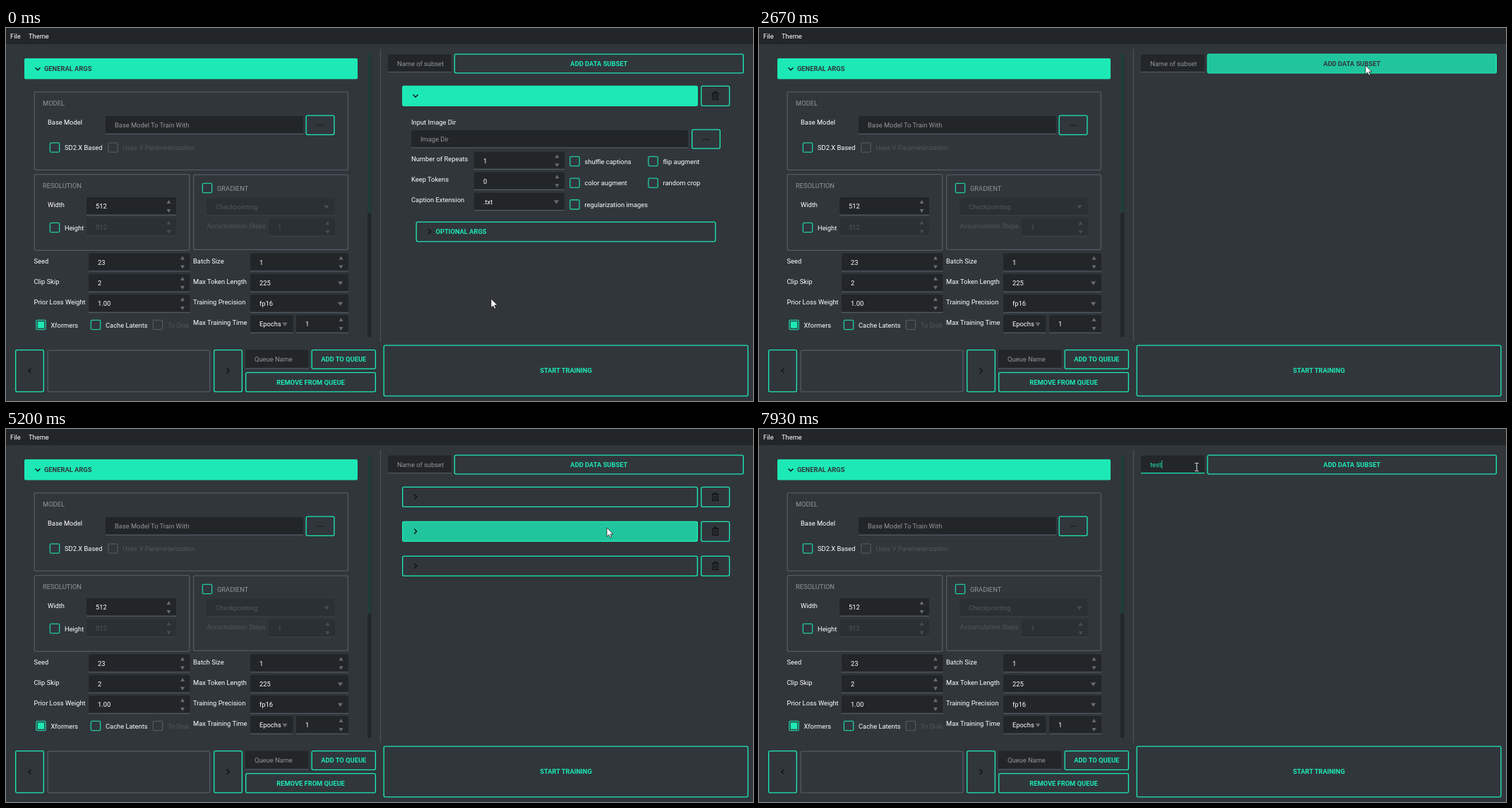
An HTML page that plays this animation: 1058x529 px, repeating every 8000 ms.

```html
<!DOCTYPE html>
<html lang="en">
<head>
<meta charset="utf-8">
<title>Training settings</title>
<style>
  html, body { margin: 0; width: 100%; height: 100%; overflow: hidden; background: #31363b; }
  svg { display: block; width: 100vw; height: 100vh; }
  text { font: 9.33px Roboto, "Open Sans", sans-serif; white-space: pre; }
  .bold { font-weight: 700; }
</style>
</head>
<body>
<svg id="stage" viewBox="0 0 1058 529">
  <g id="static"></g>
  <g id="live"></g>
  <g id="pointer"></g>
</svg>
<script>
const TEAL = '#1de9b6', BG = '#31363b', DARK = '#232629', EDGE = '#4f5b62';
const WHITE = '#fff', HINT = '#92969a', DIM = '#50575d', INK = '#0d0f10';
const FILLS = { hover: '#2d5a54', press: '#21c59d' };
const LINE = 1.33;

// ---- drawing helpers ----
const rect = (x0, y0, x1, y1, fill, stroke = 'none', r = 2) => {
  const inset = stroke === 'none' ? 0 : LINE / 2;
  return `<rect x="${x0 + inset}" y="${y0 + inset}" width="${x1 - x0 - 2 * inset}" height="${y1 - y0 - 2 * inset}"
    rx="${r}" fill="${fill}" stroke="${stroke}" stroke-width="${LINE}"/>`;
};
const text = (s, x, cy, fill = WHITE, attrs = '') =>
  `<text x="${x}" y="${cy + 3.3}" fill="${fill}" ${attrs}>${s}</text>`;
const bold = (s, x, cy, fill = TEAL, anchor = 'start') =>
  text(s, x, cy, fill, `class="bold" text-anchor="${anchor}"`);
const stroke = (d, color, width = LINE) =>
  `<path d="${d}" fill="none" stroke="${color}" stroke-width="${width}"/>`;

const chevron = (x, y, dir, color = INK) => stroke({
  down: `M${x - 3.5} ${y - 1.8}l3.5 3.5l3.5-3.5`,
  right: `M${x - 1.8} ${y - 3.5}l3.5 3.5l-3.5 3.5`,
  left: `M${x + 1.8} ${y - 3}l-3.5 3l3.5 3`
}[dir], color);

const triangle = (x, y, sign, color, half = 3) =>
  `<path d="M${x - half} ${y - sign * 2.6}h${2 * half}l${-half} ${sign * 5.2}z" fill="${color}"/>`;

const outline = (x0, y0, x1, y1) => rect(x0, y0, x1, y1, 'none', EDGE);

const button = (x0, y0, x1, y1, label = '', state = '') =>
  rect(x0, y0, x1, y1, FILLS[state] || 'none', TEAL) +
  bold(label, (x0 + x1) / 2, (y0 + y1) / 2, state === 'press' ? BG : TEAL, 'middle');

const browse = (x0, y0, x1, y1) => button(x0, y0, x1, y1) + [-3.2, 0, 3.2].map(dx =>
  `<circle cx="${(x0 + x1) / 2 + dx}" cy="${(y0 + y1) / 2 + .3}" r=".9" fill="${INK}"/>`).join('');

const field = (x0, y0, x1, y1, label, color = WHITE, line = EDGE) =>
  rect(x0, y0, x1, y1, color === DIM ? '#2b3034' : DARK) +
  `<rect x="${x0}" y="${y1 - LINE}" width="${x1 - x0}" height="${LINE}" fill="${color === DIM ? '#3b4146' : line}"/>` +
  text(label, x0 + 13, (y0 + y1) / 2, color);

const arrowColor = color => color === DIM ? '#474e54' : '#666c71';

const spin = (x0, y0, x1, y1, label, color) => field(x0, y0, x1, y1, label, color) +
  triangle(x1 - 10.5, (y0 + y1) / 2 - 6.5, -1, arrowColor(color)) +
  triangle(x1 - 10.5, (y0 + y1) / 2 + 6.5, 1, arrowColor(color));

const combo = (x0, y0, x1, y1, label, color) => field(x0, y0, x1, y1, label, color) +
  triangle(x1 - 11.5, (y0 + y1) / 2 + .3, 1, arrowColor(color), 3.6);

const check = (cx, cy, label, color = WHITE, on = false) =>
  rect(cx - 7.3, cy - 7.3, cx + 7.3, cy + 7.3, 'none', color === DIM ? DIM : '#1fcba1', 1.5) +
  (on ? rect(cx - 4.7, cy - 4.7, cx + 4.7, cy + 4.7, TEAL, 'none', 0) : '') +
  text(label, cx + 14, cy + .3, color);

// ---- fixed part of the window ----
function staticParts() {
  const parts = [
    rect(0, 0, 1058, 23, DARK, 'none', 0),
    text('File', 6, 11.5), text('Theme', 32, 11.5),
    rect(26, 43, 498, 72.5, TEAL), chevron(45, 58, 'down'), bold('GENERAL ARGS', 54, 58, BG),
    rect(512, 37, 517.3, 438, DARK, 'none', 0), rect(512, 37, 517.3, 262, '#213d38', 'none', 0),
    stroke('M530.3 30V445', EDGE, 1),

    outline(39.5, 90, 485, 202), text('MODEL', 52, 107, HINT),
    text('Base Model', 59, 134),
    field(141, 125, 421, 151, 'Base Model To Train With', HINT),
    browse(424.5, 123.5, 465.5, 152),
    check(69, 169.5, 'SD2.X Based'), check(151.5, 169.5, 'Uses V Parameterization', DIM),

    outline(39.5, 207, 260.5, 316), text('RESOLUTION', 52, 224, HINT),
    text('Width', 59, 251), spin(114, 240, 241, 266, '512'),
    check(69, 283, 'Height'), spin(114, 269.5, 241, 295.5, '512', DIM),

    outline(265, 207.5, 485, 315), check(285, 227, ''), text('GRADIENT', 299, 227.3, HINT),
    combo(284, 241, 465.5, 266.5, 'Checkpointing', DIM),
    text('Accumulation Steps', 284.5, 281, DIM), spin(372, 270, 466, 296, '1', DIM),

    check(49.5, 421, 'Xformers', WHITE, true), check(127, 421, 'Cache Latents'),
    check(215, 421, 'To Disk', DIM),

    button(13, 456, 54, 516.5), chevron(33.5, 486, 'left'),
    outline(58.5, 456.5, 289.5, 516.5),
    button(294, 456, 335, 516.5), chevron(314.5, 486, 'right'),
    field(339, 456.5, 428.5, 483.5, 'Queue Name', HINT),
    button(432.5, 456, 524, 484, 'ADD TO QUEUE'),
    button(339, 488, 524, 516.5, 'REMOVE FROM QUEUE'),
    button(534.5, 449.5, 1051.5, 522.5, 'START TRAINING')
  ];
  [['Seed', '23', 'Batch Size', '1', spin],
   ['Clip Skip', '2', 'Max Token Length', '225', combo],
   ['Prior Loss Weight', '1.00', 'Training Precision', 'fp16', combo]
  ].forEach(([leftLabel, left, rightLabel, right, kind], i) => {
    const y = 319.5 + 29.3 * i;
    parts.push(text(leftLabel, 39.5, y + 10.8), spin(117, y, 260.5, y + 26, left),
      text(rightLabel, 265, y + 10.8), kind(346, y, 485, y + 26, right));
  });
  parts.push(text('Max Training Time', 265, 418), combo(346, 407, 406.5, 433, 'Epochs'),
    spin(411, 407, 485, 433, '1'));
  return parts.join('');
}

// ---- data subsets ----
const subsetBody = [
  text('Input Image Dir', 574, 134),
  field(574, 145, 966, 170.5, 'Image Dir', HINT), browse(971, 143.5, 1012, 171.5),
  text('Number of Repeats', 574, 186), spin(663, 175.5, 791, 201, '1'),
  text('Keep Tokens', 574, 215), spin(663, 204.5, 791, 230, '0'),
  text('Caption Extension', 574, 244), combo(663, 233.8, 791, 259.3, '.txt'),
  check(805.5, 189, 'shuffle captions'), check(916.5, 189, 'flip augment'),
  check(805.5, 219.7, 'color augment'), check(916.5, 219.7, 'random crop'),
  check(805.5, 250.4, 'regularization images'),
  button(580.5, 274.5, 1005.5, 303.5), chevron(600, 289, 'right'), bold('OPTIONAL ARGS', 608.5, 289)
].join('');

const trash = stroke('M999.6 92.6h10M1002.8 92.3v-1.8h3.6v1.8M1000.8 92.8v8.6h7.6v-8.6M1003.4 94.8v4.6M1005.8 94.8v4.6', INK, 1.1);

function subset(y, open, headState, trashState) {
  const fill = FILLS[headState] || 'none';
  return `<g transform="translate(0 ${y})">` +
    rect(561, 81.7, 980, 111, open && headState !== 'press' ? TEAL : fill, TEAL) +
    chevron(580, 96.3, open ? 'down' : 'right') +
    button(984, 81.7, 1025.3, 111, '', trashState) + trash +
    (open ? subsetBody : '') + '</g>';
}

// ---- timeline, counted in ticks of 1/15 s ----
const TICKS = 120, LOOP = 8000;

// one letter per subset: o = open, c = closed
const lists = [[0, 'o'], [19, 'c'], [23, 'o'], [29, ''], [41, 'o'], [46, 'oc'], [51, 'occ'], [59, 'ccc'],
  [79, 'coc'], [83, 'ccc'], [90, 'cc'], [96, 'c'], [101, '']];

const names = [[0, ''], [114, 't'], [115, 'te'], [118, 'tes'], [119, 'test']];

const highlights = [
  [18, 'head0', 'press'], [19, 'head0', 'hover'], [22, 'head0', 'press'], [23, 'head0', 'hover'],
  [27, 'trash0', 'hover'], [28, 'trash0', 'press'], [29, '', ''],
  [40, 'add', 'press'], [41, 'add', 'hover'], [45, 'add', 'press'], [46, 'add', 'hover'],
  [50, 'add', 'press'], [51, 'add', 'hover'], [55, '', ''],
  [58, 'head0', 'press'], [59, 'head0', 'hover'], [63, '', ''],
  [66, 'head1', 'hover'], [78, 'head1', 'press'], [79, 'head1', 'hover'],
  [82, 'head1', 'press'], [83, 'head1', 'hover'], [87, 'trash1', 'hover'],
  [89, 'trash1', 'press'], [90, '', ''], [95, 'trash1', 'press'], [96, '', ''],
  [100, 'trash0', 'press'], [101, '', '']];

const path = [[0, 687, 384], [3, 712, 412], [5, 790, 400], [9, 930, 280], [13, 950, 126], [14, 935, 118],
  [16, 885, 107], [17, 875, 104], [23, 875, 104], [25, 925, 100], [27, 993, 97], [30, 998, 96],
  [33, 900, 62], [34, 862, 56], [35, 859, 53], [51, 859, 53], [52, 857, 58], [54, 839, 87],
  [56, 836, 94], [60, 836, 94], [63, 845, 118], [67, 852, 138], [72, 852, 138], [76, 851, 140],
  [83, 851, 140], [88, 998, 142], [96, 998, 142], [99, 996, 96], [101, 996, 96], [106, 640, 60],
  [107, 621, 58], [109, 621, 58], [110, 620, 54], [120, 620, 54]];

const latest = (steps, tick) => steps.filter(s => s[0] <= tick).pop() || [];

function pointerAt(tick) {
  const i = Math.max(1, path.findIndex(p => p[0] >= tick));
  const [t0, x0, y0] = path[i - 1], [t1, x1, y1] = path[i];
  const k = (tick - t0) / (t1 - t0);
  return [x0 + (x1 - x0) * k, y0 + (y1 - y0) * k];
}

const arrow = '<path transform="scale(.72)" d="M0 0V17.5L4 13.8L6.6 19.6L9.4 18.4L6.9 12.6H12.4Z" fill="#fff" stroke="#111" stroke-width="1"/>';
const beam = stroke('M-2.7-5.6H-.6L0-5L.6-5.6H2.7M0-5V5M-2.7 5.6H-.6L0 5L.6 5.6H2.7', '#e6e6e6', 1);

const byId = id => document.getElementById(id);
const live = byId('live'), pointer = byId('pointer');
byId('static').innerHTML = staticParts();

function nameField(tick) {
  const name = latest(names, tick)[1], focused = tick >= 108;
  const caretX = 554.7 + 9.33 * [0, .327, .857, 1.373, 1.7][name.length];
  return field(541, 37.5, 631, 63.2, name ? '' : 'Name of subset', HINT, focused ? TEAL : EDGE) +
    text(name, 554, 50.2, TEAL) +
    (focused ? stroke(`M${caretX} 44.5V56`, TEAL, .9) : '');
}

function render(tick) {
  const [, target, state] = latest(highlights, tick);
  const stateOf = id => id === target ? state : '';
  let y = 0;
  const rows = [...latest(lists, tick)[1]].map((mode, i) => {
    const open = mode === 'o';
    const row = subset(y, open, stateOf('head' + i), stateOf('trash' + i));
    y += open ? 254.7 : 49;
    return row;
  });
  live.innerHTML = nameField(tick) +
    button(634.7, 36.5, 1045, 64.5, 'ADD DATA SUBSET', stateOf('add')) + rows.join('');
  const [px, py] = pointerAt(tick);
  pointer.setAttribute('transform', `translate(${px} ${py})`);
  pointer.innerHTML = tick >= 107 ? beam : arrow;
}

let shown = -1;
const start = performance.now();
function frame(now) {
  const t = Math.max(0, now - start) % LOOP;
  const tick = Math.min(TICKS - 1, Math.floor((t + 5) * TICKS / LOOP));
  if (tick !== shown) render(shown = tick);
  requestAnimationFrame(frame);
}
frame(start);
</script>
</body>
</html>
```
